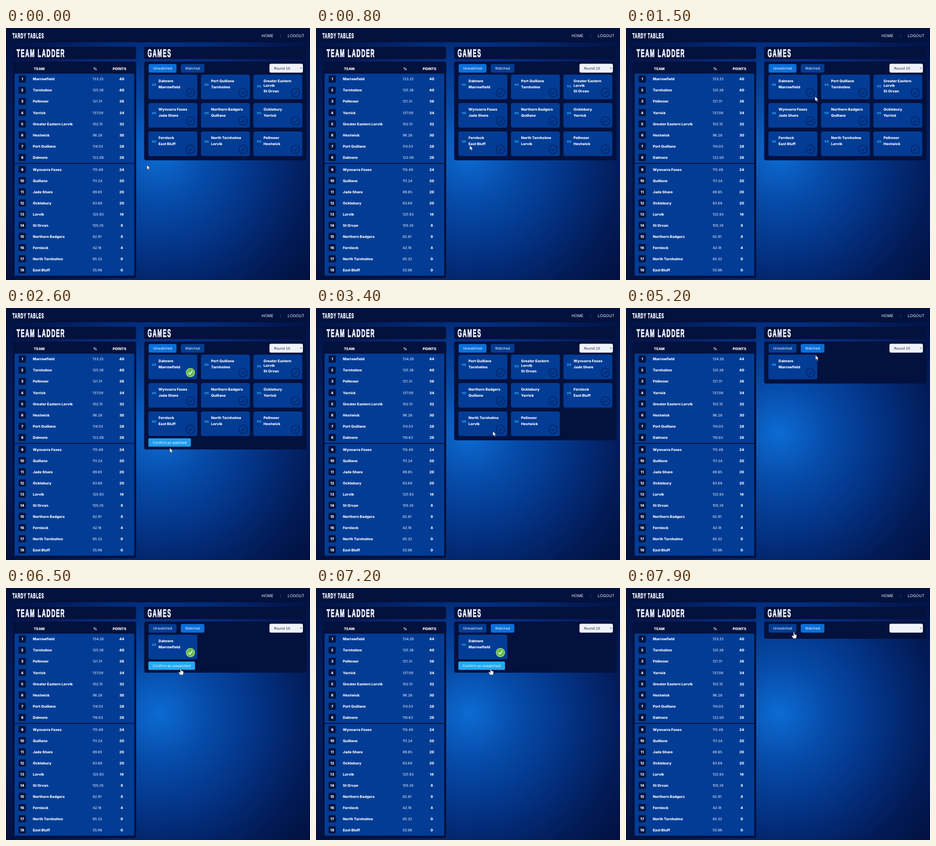
An HTML page that plays this animation: 600 by 497 pixels, repeating every 8 s.

```html
<!DOCTYPE html>
<html lang="en">
<head>
<meta charset="utf-8">
<title>Team ladder</title>
<style>
  html, body { margin: 0; width: 100%; height: 100%; overflow: hidden; background: #020f3f; }
  svg { display: block; width: 600px; height: 497px; }
  text { font: 400 7px Inter, sans-serif; fill: #f2f6ff; text-rendering: geometricPrecision; }
  .bold { font-weight: 800; font-size: 7.1px; fill: #fff; }
  .nav { font-size: 7.8px; }
  .head { font: 700 21.5px "Liberation Sans", Arial, sans-serif; letter-spacing: .15em; stroke: #f2f6ff; stroke-width: 1.1px; }
  .logo { font-size: 13.8px; letter-spacing: .13em; stroke-width: .8px; }
  .vs { font-weight: 800; font-size: 5.9px; fill: #2fb4f2; }
  .round { font: 6.7px "DejaVu Sans", sans-serif; fill: #1c2233; }
  .mid { text-anchor: middle; }
  .panel { fill: #02113d; }
  .card { fill: #033c95; }
  .badge { fill: #02133f; stroke: #0e4396; stroke-width: .6px; }
  .tab { fill: #043c92; }
  .tab.on { fill: #0a6fd9; }
  .select { fill: #eff3fb; }
  .confirm { fill: #1f9bec; }
  .confirm.hover { fill: #24a9f2; }
  .tick { fill: none; stroke: #031d58; stroke-width: 1.2px; }
  .tick.on { fill: #69bd48; stroke: #a5dc86; }
  .tick.on + .tick { stroke: #fff; stroke-width: 1.7px; }
</style>
</head>
<body>
<svg viewBox="0 0 600 497">
  <defs>
    <radialGradient id="glow" gradientUnits="userSpaceOnUse" cx="303" cy="248" r="388">
      <stop offset="0" stop-color="#0b6bd2"/>
      <stop offset=".11" stop-color="#0a5dc0"/>
      <stop offset=".25" stop-color="#064ba8"/>
      <stop offset=".42" stop-color="#043b92"/>
      <stop offset=".6" stop-color="#032a75"/>
      <stop offset=".8" stop-color="#021a55"/>
      <stop offset="1" stop-color="#02103f"/>
    </radialGradient>
  </defs>
  <rect width="600" height="497" fill="url(#glow)"/>
  <g id="page"></g>
  <g id="arrow">
    <path d="M0 0V9.2L2.2 7.3L3.8 10.8L5.4 10L3.9 6.7H6.7Z" fill="#fff" stroke="#0a1430" stroke-width=".6"/>
  </g>
  <g id="hand">
    <path d="M-1 .8Q0-.6 1 .8V4.2L4.6 5Q5.6 5.4 5.4 7.2L4.6 12.4H-1.4L-4.4 7.8Q-4.4 6.2-2.8 6.6L-1 8Z"
      fill="#fff" stroke="#0a1430" stroke-width=".6" stroke-linejoin="round"/>
  </g>
</svg>
<script>
const LOOP = 8000, STEP = 100;

const teams = [
  ["Marrowfield", "133.25", 40], ["Tarnholme", "125.38", 40], ["Pellmoor", "121.31", 36],
  ["Yarrick", "137.09", 34], ["Greater Eastern Lorvik", "102.15", 32], ["Hestwick", "96.28", 30],
  ["Port Quillane", "114.03", 28], ["Dalmere", "122.06", 26], ["Wynvarra Foxes", "115.49", 24],
  ["Quillane", "111.24", 20], ["Jade Shore", "89.85", 20], ["Ocklebury", "83.68", 20],
  ["Lorvik", "125.93", 14], ["St Orvan", "105.35", 8], ["Northern Badgers", "82.81", 8],
  ["Fernlock", "42.18", 4], ["North Tarnholme", "65.32", 0], ["East Bluff", "55.96", 0]
];
// Results that count once the first game is marked as watched
const updated = { 0: ["134.26", 44], 7: ["116.63", 26] };
// Pairs of team indices
const games = [[7, 0], [6, 1], [4, 13], [8, 10], [14, 9], [11, 3], [15, 17], [16, 12], [2, 5]];

// Times of the clicks
const PICK = 2000, CONFIRM = 2900, TAB = 4200, UNPICK = 5900, UNDO = 7300;

// time, x, y of the pointer
const path = [
  [0, 278, 270], [500, 284, 258], [1500, 373, 135], [1800, 365, 127], [2100, 365, 127],
  [2600, 323, 276], [2800, 326, 267], [3000, 328, 266], [3400, 349, 243], [4000, 371, 81],
  [4700, 371, 81], [5200, 374, 93], [5700, 364, 127], [6000, 364, 127],
  [6500, 345, 159], [7300, 345, 159], [7900, 331.5, 87]
];

const rect = (x, y, w, h, cls, r = 4) =>
  `<rect x="${x}" y="${y}" width="${w}" height="${h}" rx="${r}" class="${cls}"/>`;
const text = (x, y, str, cls = "") => `<text x="${x}" y="${y}" class="${cls}">${str}</text>`;
const heading = (x, y, str, cls = "") =>
  `<text transform="translate(${x} ${y}) scale(.5 1)" class="head ${cls}">${str}</text>`;

function ladder(counted) {
  let out = rect(13, 37, 244, 24.5, "panel") + heading(21, 57, "TEAM LADDER")
    + rect(13, 66, 244, 427, "panel")
    + rect(17, 90, 236, 176.3, "card", 0) + rect(17, 268, 236, 220.5, "card", 0)
    + text(55, 82.7, "TEAM", "bold") + text(176, 82.7, "%", "bold mid")
    + text(224, 82.7, "POINTS", "bold mid");
  teams.forEach(([name, percent, points], i) => {
    const y = i < 8 ? 100.6 + 22.1 * i : 279.1 + 22 * (i - 8);
    if (counted && updated[i]) [percent, points] = updated[i];
    out += rect(24.5, y - 7.5, 15, 15, "badge", 3)
      + text(32, y + 2.6, i + 1, "bold mid") + text(53, y + 2.6, name, "bold")
      + text(171, y + 2.6, percent) + text(228.5, y + 2.6, points, "bold mid");
  });
  return out;
}

function card([home, away], i, picked) {
  const x = [281, 384.8, 488.3][i % 3], y = 92 + 56 * Math.floor(i / 3);
  const name = teams[home][0], words = name.split(" ");
  const long = words.length > 2;
  const lines = long ? [words.slice(0, 2).join(" "), words[2]] : [name];
  lines.push(teams[away][0]);
  const tops = long ? [15, 23.5, 35.2] : [15.2, 27];
  return rect(x, y, 96.5, 48.5, "card")
    + text(x + 6.8, y + (long ? 25 : 21.5), "VS", "vs")
    + lines.map((line, n) => text(x + 20, y + tops[n], line, "bold")).join("")
    + `<g transform="translate(${x + 83} ${y + 35.3})"><circle r="8.4" class="tick ${picked ? "on" : ""}"/>`
    + `<path d="M-3.8 .2L-1.2 3L4-3" class="tick"/></g>`;
}

function board(s) {
  const rows = Math.ceil(s.list.length / 3);
  const end = 84 + 56 * rows;
  const height = rows ? end + 9 - 66 + (s.picked ? 18 : 0) : 34;
  let out = rect(272.6, 37, 320.6, 24.5, "panel") + heading(279.5, 57, "GAMES")
    + rect(272.6, 66, 320.6, height, "panel")
    + rect(281.5, 71, 55, 17, "tab " + (s.watched ? "" : "on"), 3) + text(309, 82, "Unwatched", "mid")
    + rect(345, 71, 46.5, 17, "tab " + (s.watched ? "on" : ""), 3) + text(368.2, 82, "Watched", "mid")
    + rect(520, 70.5, 66, 17.5, "select", 3)
    + (rows ? text(529, 81.8, "Round 10", "round") : "")
    + '<path d="M580.3 78.3l1.7 1.8l1.7-1.8" fill="none" stroke="#1c2233" stroke-width=".9"/>';
  s.list.forEach((game, i) => out += card(game, i, s.picked && i === 0));
  if (s.picked) {
    const w = s.watched ? 92 : 84;
    out += rect(281, end + 5, w, 16.5, "confirm " + (s.hover ? "hover" : ""), 2)
      + text(281 + w / 2, end + 15.8, "Confirm as " + (s.watched ? "unwatched" : "watched"), "mid");
  }
  return out;
}

const nav = rect(0, 0, 600, 28, "panel", 0) + heading(12.7, 20, "TARDY TABLES", "logo")
  + text(516, 18, "HOME", "nav mid") + text(572.5, 18, "LOGOUT", "nav mid")
  + '<path d="M542 11V19" stroke="#1d4783" stroke-width=".8"/>';

function pointer(t) {
  const n = path.findIndex(p => p[0] > t);
  if (n < 0) return path[path.length - 1].slice(1);
  const [t0, x0, y0] = path[n - 1], [t1, x1, y1] = path[n];
  const k = (t - t0) / (t1 - t0), e = k * k * (3 - 2 * k);
  return [x0 + (x1 - x0) * e, y0 + (y1 - y0) * e];
}

function state(t) {
  const counted = t >= CONFIRM && t < UNDO;
  const watched = t >= TAB;
  const list = t >= UNDO ? [] : watched ? games.slice(0, 1) : counted ? games.slice(1) : games;
  const picked = t >= PICK && t < CONFIRM || t >= UNPICK && t < UNDO;
  return { counted, watched, list, picked };
}

const inside = (x, y, l, t, r, b) => x >= l && x <= r && y >= t && y <= b;
const $ = id => document.getElementById(id);
let shown = "";

function draw() {
  const t = Math.floor(performance.now() % LOOP / STEP) * STEP;
  const [x, y] = pointer(t), s = state(t);
  const top = s.watched ? 145 : 257;
  s.hover = s.picked && inside(x, y, 281, top, s.watched ? 373 : 365, top + 16.5);
  const onTab = inside(x, y, 281, 71, 336, 88) || inside(x, y, 345, 71, 391, 88);
  const onTick = s.list.some((g, i) =>
    Math.hypot(x - 364 - 103.7 * (i % 3), y - 127.3 - 56 * Math.floor(i / 3)) < 8.5);
  const hand = s.hover || onTab || onTick;

  const key = JSON.stringify(s);
  if (key !== shown) {
    $("page").innerHTML = nav + ladder(s.counted) + board(s);
    shown = key;
  }
  for (const id of ["arrow", "hand"]) {
    $(id).setAttribute("transform", `translate(${x} ${y})`);
    $(id).style.display = (id === "hand") === hand ? "" : "none";
  }
  requestAnimationFrame(draw);
}
draw();
</script>
</body>
</html>
```
